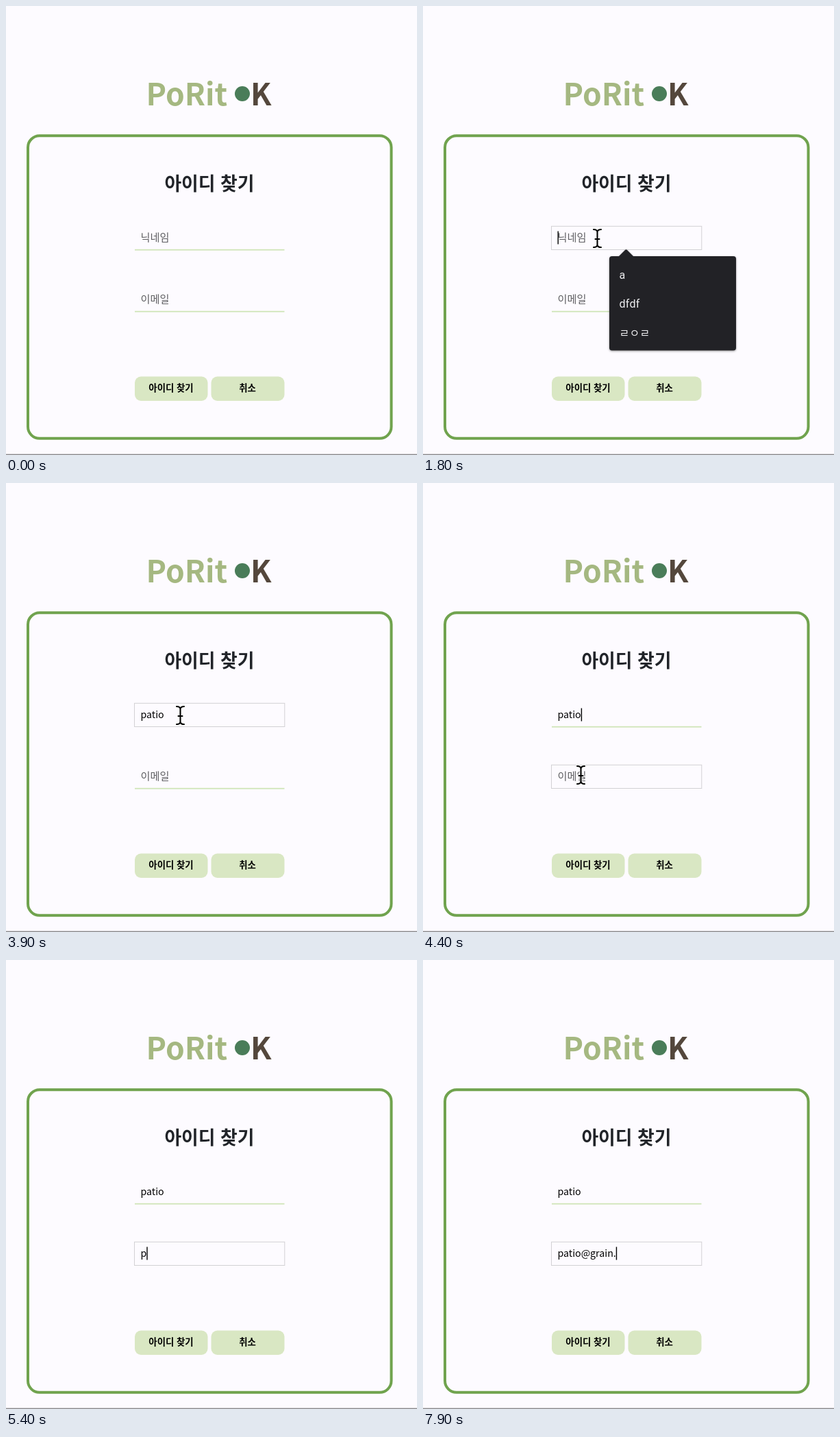
Animation, 600 px wide and 655 px high, one loop 8000 ms. Source, as an HTML page:

```html
<!DOCTYPE html>
<html lang="ko">
<head>
<meta charset="utf-8">
<title>아이디 찾기</title>
<style>
  html, body { margin: 0; width: 100%; height: 100%; overflow: hidden; background: #fdfbff; }
  svg { display: block; }
  text { font-family: "Noto Sans CJK KR", "Noto Sans CJK", "Noto Sans KR", sans-serif; }
  .brand { font-size: 44.4px; font-weight: 700; }
  .title { font-size: 26.9px; font-weight: 700; fill: #212429; text-anchor: middle; }
  .label { font-size: 13.4px; font-weight: 700; text-anchor: middle; }
  .hint { font-size: 15.2px; fill: #5f5f62; }
  .value { font-size: 14.2px; font-weight: 500; fill: #000; }
  .menu text { font-family: Roboto, "Noto Sans CJK KR", sans-serif; font-size: 16px; letter-spacing: .25px; fill: #eeeef0; }
</style>
</head>
<body>
<svg width="600" height="655" viewBox="0 0 600 655">
  <defs>
    <filter id="shade" x="-10%" y="-10%" width="120%" height="125%">
      <feDropShadow dx="0" dy="1" stdDeviation="1.5" flood-opacity=".4"/>
    </filter>
  </defs>
  <rect width="600" height="655" fill="#fdfbff"/>
  <text class="brand" x="204.5" y="145" fill="#a5b881">PoRit</text>
  <circle cx="345" cy="128" r="11" fill="#4a7d59"/>
  <text class="brand" x="357" y="145" fill="#54473c">K</text>
  <rect x="32" y="189.3" width="530.5" height="441.5" rx="17" fill="none" stroke="#70a34e" stroke-width="4"/>
  <text class="title" x="297" y="269">아이디 찾기</text>
  <g id="fields"></g>
  <g fill="#d9e7c3">
    <rect x="188" y="540.5" width="106.5" height="35.5" rx="9"/>
    <rect x="299.5" y="540.5" width="107" height="35.5" rx="9"/>
  </g>
  <text class="label" x="241" y="562">아이디 찾기</text>
  <text class="label" x="352.5" y="562">취소</text>
  <rect y="653.6" width="600" height="1.4" fill="#8b8a8d"/>
  <g id="menus"></g>
  <rect id="caret" width="1.4" height="19" fill="#000"/>
  <g id="beam" fill="none" stroke-linecap="round" stroke-linejoin="round">
    <path stroke="#fff" stroke-width="4"/>
    <path stroke="#000" stroke-width="2.1"/>
  </g>
</svg>
<script>
const LOOP = 8000;
const NS = "http://www.w3.org/2000/svg";
const $ = id => document.getElementById(id);

function add(parent, tag, attrs, text) {
  const el = document.createElementNS(NS, tag);
  for (const k in attrs) el.setAttribute(k, attrs[k]);
  if (text) el.textContent = text;
  return parent.appendChild(el);
}
const show = (el, on) => el.setAttribute("visibility", on ? "visible" : "hidden");

function makeField(y, hint) {
  const g = $("fields");
  return {
    y,
    line: add(g, "rect", { x: 188, y: y + 33.8, width: 218.5, height: 1.8, fill: "#cfe5b8" }),
    box: add(g, "rect", { x: 187.5, y: y + .3, width: 219.3, height: 34.2, fill: "none", stroke: "#d2d1d4" }),
    hint: add(g, "text", { class: "hint", x: 196.5, y: y + 21.5 }, hint),
    value: add(g, "text", { class: "value", x: 196.5, y: y + 21.5 })
  };
}

function makeMenu(y, width, height, items) {
  const g = add($("menus"), "g", { class: "menu" });
  const body = add(g, "g", { fill: "#222427", filter: "url(#shade)" });
  add(body, "rect", { x: 272, y, width, height, rx: 4 });
  add(body, "path", { d: `M285 ${y + 1}L295 ${y - 9}Q296.5 ${y - 10.5} 298 ${y - 9}L308 ${y + 1}Z` });
  items.forEach((s, i) => add(g, "text", { x: 286.5, y: y + 32.5 + 42.7 * i }, s));
  return g;
}

const nick = makeField(321, "닉네임");
const mail = makeField(411, "이메일");
const nickMenu = makeMenu(365, 185, 137.5, ["a", "dfdf", "ㄹㅇㄹ"]);
const mailMenu = makeMenu(455, 214, 230, [
  "solimint27@grain.com", "dodo3816@cedar.com", "dodo3816@grain.com", "a", "tktk594@cedar.com"
]);

const nickText = "patio", nickKeys = [2100, 2300, 2400, 2600, 3200];
const mailText = "patio@grain.";
const mailKeys = [5300, 5500, 5700, 5900, 6100, 6200, 6600, 6700, 6800, 6900, 7000, 7900];

// caret: [start, end] spans in which it is lit
const lit = [[800, 1300], [1800, 2900], [3200, 3700], [4200, 4900], [5300, 7700], [7900, 8000]];

// pointer: [time, x, y]
const trips = [
  [[300, 266, 346], [900, 256, 341], [1500, 254.5, 339], [2100, 254.5, 339]],
  [[3900, 254.5, 339], [4300, 230.5, 426], [4500, 230.5, 426], [4900, 236, 423], [5300, 236, 423]]
];

const within = (t, a, b) => t >= a && t < b;
const typed = (s, keys, t) => s.slice(0, keys.filter(k => t >= k).length);

function pointer(t) {
  const trip = trips.find(p => within(t, p[0][0], p[p.length - 1][0]));
  if (!trip) return null;
  const i = trip.findIndex(p => p[0] > t);
  const [t0, x0, y0] = trip[i - 1], [t1, x1, y1] = trip[i];
  const u = (t - t0) / (t1 - t0), e = u * u * (3 - 2 * u);
  return [x0 + (x1 - x0) * e, y0 + (y1 - y0) * e];
}

function setField(f, text, focused) {
  show(f.box, focused);
  show(f.line, !focused);
  show(f.hint, !text);
  if (f.value.textContent !== text) f.value.textContent = text;
}

for (const p of $("beam").children)
  p.setAttribute("d", "M-5.5-13Q0-13 0-9Q0-13 5.5-13M0-9V9M-5.5 13Q0 13 0 9Q0 13 5.5 13M-3 1H3");

function draw(t) {
  setField(nick, typed(nickText, nickKeys, t), within(t, 800, 4400));
  setField(mail, typed(mailText, mailKeys, t), t >= 4400);
  show(nickMenu, within(t, 1100, 2100));
  show(mailMenu, within(t, 4700, 5300));

  const f = t < 4500 ? nick : mail;
  const w = f.value.textContent ? f.value.getComputedTextLength() : 0;
  $("caret").setAttribute("x", 196.5 + w);
  $("caret").setAttribute("y", f.y + 7.5);
  show($("caret"), lit.some(([a, b]) => within(t, a, b)));

  const p = pointer(t);
  show($("beam"), p);
  if (p) $("beam").setAttribute("transform", `translate(${p})`);
}

const start = performance.now();
function tick() {
  draw((performance.now() - start) % LOOP);
  requestAnimationFrame(tick);
}
tick();
</script>
</body>
</html>
```
